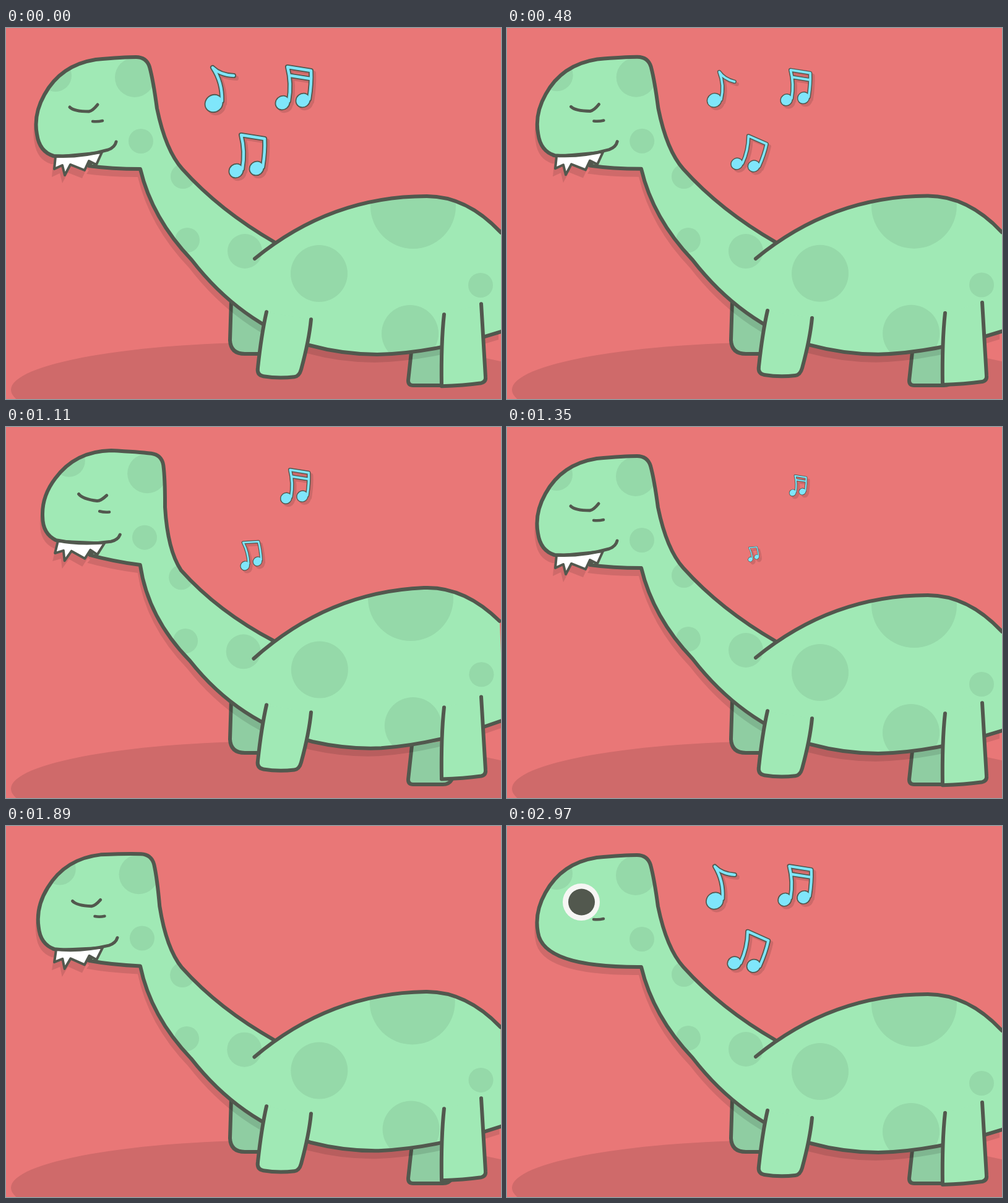
These frames come from a looping animation (800x600 px, 3 s). An HTML page with a canvas:

```html
<!DOCTYPE html>
<html>
<head>
<meta charset="utf-8">
<style>
html, body { margin: 0; width: 100%; height: 100%; overflow: hidden; background: #e97777; }
canvas { display: block; }
</style>
</head>
<body>
<canvas id="stage" width="800" height="600"></canvas>
<script>
const ctx = document.getElementById('stage').getContext('2d');
const LOOP = 3000, SONG_END = 2160, BEAT = 450, TAU = 2 * Math.PI;
const DARK = '#52584e', SKIN = '#a0e9b5', SPOT = '#95d9a9', BACK_LEG = '#8fcda2',
  CYAN = '#7fe6fb', NOTE_SHADE = '#cd6969', SHADE = 'rgba(0,0,0,.115)';

const BACK = 'M800,331 Q745,272 680,272 Q525,272 402,373 ';
const SKULL = '435,347 Q345,295 285,228 Q258,198 244,130 Q238,85 232,63 Q227,47 210,47 ' +
  'Q190,47 145,51 Q88,60 62,108 Q44,140 50,172 ';
const CHIN = 'Q58,229 217,228 ';
const JAW = 'Q54,200 77,207 Q110,209 147,203 L134,223 Q170,228 217,228 ';
const BELLY = 'Q236,308 300,375 Q378,476 490,513 Q545,528 600,528 Q690,526 800,491';
const TEETH = 'M80,208 L78,228 L91,222 L95,238 L104,221 L127,230 L134,215 L146,221 L155,201Z';
const FACE = 'M103,128 Q110,135 134,135 Q140,134 148,124 M140,151 Q148,152 156,150';
const MOUTH = 'M75,207 Q120,210 165,197 Q176,193 178,184';
const SPOTS = [[80,77,26], [208,80,32], [218,183,20], [286,240,20], [293,343,20], [386,361,28],
  [506,397,46], [658,288,69], [653,494,46], [767,416,20]];
const BACK_LEGS = ['M364,440 L362,505 Q363,527 386,527 L420,527 V440',
  'M656,515 L650,570 Q650,578 658,578 H706 Q716,578 720,571 L724,505'];
const LEGS = ['M421,460 Q413,495 407,550 Q405,562 416,564 Q440,568 466,565 Q474,564 477,553 Q490,505 493,472',
  'M708,464 Q703,510 704,580 Q740,579 768,575 Q776,573 775,565 L768,447'];

// Note shapes, relative to the point they shrink into
const SINGLE = { lines: 'M4,13 Q5,-17 -11,-41 Q1,-29 23,-28', heads: [[-9,17]], r: 14 };
const PAIR = { lines: 'M-18,25 Q-13,-3 -20,-30 L18,-24 Q19,-3 15,22', heads: [[-28,28], [5,24]], r: 11 };
const BARRED = { ...PAIR, lines: PAIR.lines + 'M-15,-16 L17,-11' };

// pulse: length of a size pulse, dip: its depth, gone/fade: leaving, back: return
const NOTES = [
  { ...SINGLE, x: 345, y: 105, pulse: 900, dip: .2, gone: 1070, fade: 200, back: 2300, tilt: 14, swing: 3000, land: 2 },
  { ...BARRED, x: 475, y: 93, pulse: 1680, dip: .27, gone: 1560, fade: 400, back: 2570, tilt: 0, swing: 3000, land: 0 },
  { ...PAIR, x: 400, y: 203, pulse: 1300, dip: .2, gone: 1580, fade: 700, back: 2420, tilt: 15, swing: 1700, land: 15 },
];

const clamp = v => Math.max(0, Math.min(1, v));
const smooth = v => clamp(v) ** 2 * (3 - 2 * clamp(v));
const wave = v => (1 - Math.cos(TAU * v)) / 2;
const rad = deg => deg * Math.PI / 180;

// Displacement of a point when turned about a pivot
function turn(x, y, px, py, a) {
  const dx = x - px, dy = y - py, c = Math.cos(a) - 1, s = Math.sin(a);
  return [dx * c - dy * s, dx * s + dy * c];
}

// The head nods around the jaw, the trunk swings around the neck base, the neck sags between
function bend(x, y, bob) {
  const head = smooth((430 - x - y / 2) / 85), trunk = clamp((x - 360) / 90);
  const sag = 3 * bob * (1 - head) * (1 - trunk);
  const [hx, hy] = turn(x, y, 217, 227, rad(8) * bob);
  const [tx, ty] = turn(x, y, 400, 375, rad(-2.5) * bob);
  return [x + head * hx + trunk * tx - sag, y + head * (hy - 5 * bob) + trunk * ty + sag];
}

const bentPath = (d, bob) => new Path2D(d.replace(/([\d.]+),([\d.]+)/g,
  (_, x, y) => bend(+x, +y, bob).map(v => v.toFixed(2)).join(',')));

function fill(path, color) {
  ctx.fillStyle = color;
  ctx.fill(path);
}

function stroke(path, width, color = DARK) {
  ctx.strokeStyle = color;
  ctx.lineWidth = width;
  ctx.stroke(path);
}

function oval(x, y, rx, ry, color, angle = 0) {
  ctx.fillStyle = color;
  ctx.beginPath();
  ctx.ellipse(x, y, rx, ry, angle, 0, TAU);
  ctx.fill();
}

function drawLegs(paths, color) {
  for (const d of paths) {
    const leg = new Path2D(d);
    fill(leg, color);
    stroke(leg, 6);
  }
}

function drawNote(n, t) {
  const growing = t > n.back;
  const scale = growing ? (t - n.back) / (LOOP - n.back)
    : clamp((n.gone - t) / n.fade) * (1 - n.dip * wave(t / n.pulse));
  if (scale < .01) return;
  const angle = growing ? n.land : n.tilt * Math.sin(TAU * t / n.swing);
  const lines = new Path2D(n.lines);
  for (const [color, grow, off] of [[NOTE_SHADE, 1.8, 4], [DARK, 1.8, 0], [CYAN, 0, 0]]) {
    ctx.save();
    ctx.translate(n.x + off, n.y + off);
    ctx.rotate(rad(angle));
    ctx.scale(scale, scale);
    stroke(lines, 4.5 + 2 * grow, color);
    for (const [x, y] of n.heads) oval(x, y, n.r + grow, n.r * .92 + grow, color, -.7);
    ctx.restore();
  }
}

function drawFace(t, singing, bob) {
  const [lid, nostril] = FACE.split(/(?= M)/);
  stroke(bentPath(nostril, bob), 4.5);
  if (singing) {
    const teeth = bentPath(TEETH, bob);
    fill(teeth, '#fff');
    stroke(teeth, 4);
    stroke(bentPath(MOUTH, bob), 5);
    stroke(bentPath(lid, bob), 5);
  } else {
    const pupil = 21.5 + 2.5 * clamp((2400 - t) / 240);
    oval(120, 123, 30, 30, '#f6f6f4');
    oval(120.5, 123, pupil, pupil, DARK);
  }
}

function draw(t) {
  const singing = t < SONG_END;
  const bob = singing ? wave((t - 5) / BEAT) : 0;
  const step = singing ? Math.abs(Math.sin(Math.PI * (t + 10) / BEAT)) : 0;
  const front = SKULL + (singing ? JAW : CHIN) + BELLY;
  const body = bentPath(BACK + 'L' + front + 'Z', bob);
  const outline = bentPath(BACK + 'M' + front, bob);

  ctx.fillStyle = '#e97777';
  ctx.fillRect(0, 0, 800, 600);
  oval(447, 585, 439, 77, '#cf6a6a');
  drawLegs(BACK_LEGS, BACK_LEG);

  ctx.save();
  ctx.translate(-4, 13);
  const shade = new Path2D(body);
  if (singing) shade.addPath(bentPath(TEETH, bob));
  fill(shade, SHADE);
  ctx.restore();

  fill(body, SKIN);
  ctx.save();
  ctx.clip(body);
  for (const [x, y, r] of SPOTS) oval(...bend(x, y, bob), r, r, SPOT);
  ctx.restore();
  stroke(outline, 6);
  drawFace(t, singing, bob);

  ctx.save();
  ctx.translate(0, -10.5 * step);
  drawLegs(LEGS, SKIN);
  ctx.restore();

  for (const note of NOTES) drawNote(note, t);
}

ctx.lineCap = ctx.lineJoin = 'round';
const start = performance.now();
function frame() {
  draw((performance.now() - start) % LOOP);
  requestAnimationFrame(frame);
}
frame();
</script>
</body>
</html>
```
